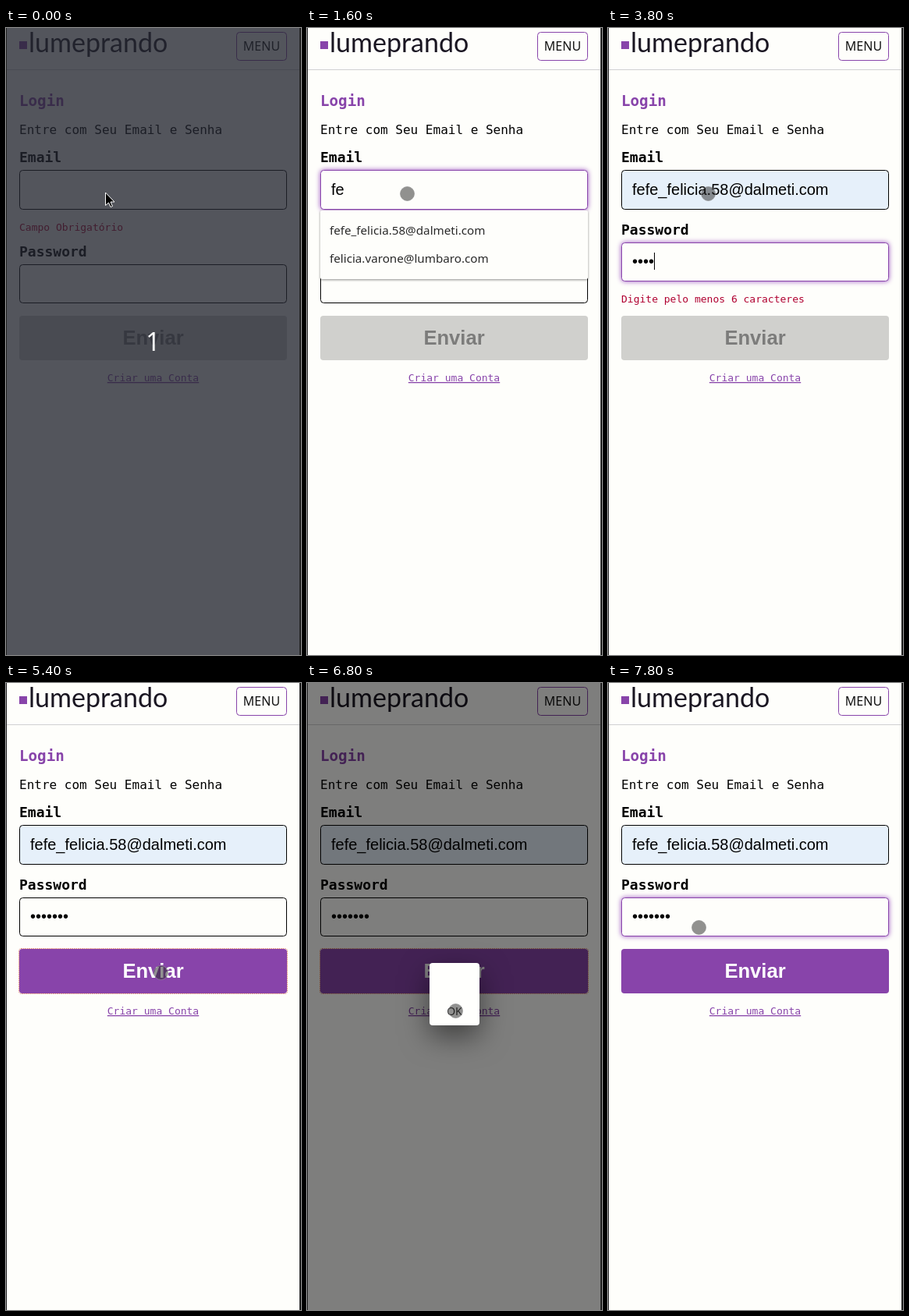
An HTML page for the animation above (8000 ms loop, 378 by 804 pixels).

```html
<!DOCTYPE html>
<html lang="pt">
<head>
<meta charset="utf-8">
<title>Login</title>
<style>
  html, body { margin: 0; width: 100%; height: 100%; overflow: hidden; background: #fefefb; }
  svg { display: block; }
  text { white-space: pre; }
  .mono { font-family: "DejaVu Sans Mono", monospace; }
  .sans { font-family: "Liberation Sans", Arial, sans-serif; }
  .ui { font-family: "Noto Sans", sans-serif; }
  .brand { font-family: Lato, sans-serif; }
  .bold { font-weight: bold; }
  .glow { filter: drop-shadow(0 0 3px #9a4fc0); }
  .menu { filter: drop-shadow(0 1px 1.5px rgba(0,0,0,.45)); }
  .dialog { filter: drop-shadow(0 14px 18px rgba(0,0,0,.5)); }
</style>
</head>
<body>
<svg id="stage" width="378" height="804" viewBox="0 0 378 804"></svg>
<script>
const LOOP = 8000, STEP = 200;
const PURPLE = '#8844aa', RED = '#b00030', PAPER = '#fefefb';
const EMAIL = 'fefe_felicia.58@dalmeti.com';
const OPTIONS = [EMAIL, 'felicia.varone@lumbaro.com', 'flavia.menura@lumbaro.com'];
const stage = document.getElementById('stage');

const clamp = v => Math.max(0, Math.min(1, v));
const ramp = (t, a, b) => clamp((t - a) / (b - a));
const ease = p => p * p * (3 - 2 * p);
const within = (t, a, b) => t >= a && t < b;

const text = (x, y, size, cls, fill, str, extra = '') =>
  `<text x="${x}" y="${y}" font-size="${size}" class="${cls}" fill="${fill}" ${extra}>${str}</text>`;
const rect = (x, y, w, h, fill, extra = '') =>
  `<rect x="${x}" y="${y}" width="${w}" height="${h}" fill="${fill}" ${extra}/>`;
const caret = (x, y) => rect(x, y, 1, 22, '#000');
const field = (y, h, focus, fill = PAPER) =>
  rect(17.5, y + .5, 342, h - 1, fill,
    `rx="4" stroke="${focus ? PURPLE : '#000'}" ${focus ? 'class="glow"' : ''}`);

function header() {
  return rect(1, 53, 375, 1, '#d0d0d2') +
    rect(17, 17, 10, 10, PURPLE) +
    text(29, 31, 34, 'brand', '#1a1622', 'lumeprando') +
    rect(295.5, 5.5, 64, 36, PAPER, `rx="4" stroke="${PURPLE}"`) +
    text(327.5, 29, 16, 'ui', '#111', 'MENU', 'text-anchor="middle"');
}

function form(t) {
  const emailError = t < 2200, passError = within(t, 3200, 4000), ready = t >= 4000;
  const typed = t < 1000 ? '' : t < 1200 ? 'f' : t < 2000 ? 'fe' : EMAIL;
  const dots = t < 3200 ? 0 : t < 4000 ? Math.floor((t - 3000) / STEP) : t < 4400 ? 6 : 7;
  const emailFocus = within(t, 400, 2200);
  const passFocus = within(t, 2200, 5400) || t >= 7600;
  const passCaret = within(t, 2200, 2600) || within(t, 3200, 5000) || within(t, 7600, 7800);
  const py = emailError ? 28 : 0;
  const by = emailError || passError ? 28 : 0;

  let s = text(17, 100, 19.2, 'mono bold', PURPLE, 'Login') +
    text(17, 136, 16, 'mono', '#000', 'Entre com Seu Email e Senha') +
    text(17, 172, 18, 'mono bold', '#000', 'Email') +
    field(182, 51, emailFocus, t >= 2000 ? '#e6f0fa' : PAPER) +
    text(31, 214, 20, 'sans', '#000', typed);
  if (within(t, 400, 1600)) s += caret([31, 37, 47][typed.length], 196);
  if (emailError) s += text(17, 260, 13, 'mono', RED, 'Campo Obrigatório');

  s += text(17, 265 + py, 18, 'mono bold', '#000', 'Password') +
    field(275 + py, 50, passFocus) +
    text(31, 306, 20, 'sans', '#000', '•'.repeat(dots));
  if (passCaret) s += caret(31 + dots * 7, 288);
  if (passError) s += text(17, 352, 13, 'mono', RED, 'Digite pelo menos 6 caracteres');

  s += rect(17, 341 + by, 343, 57, ready ? PURPLE : '#d0d0cd', 'rx="4"');
  if (within(t, 5400, 7600))
    s += rect(16.5, 340.5, 344, 58, 'none', 'rx="3" stroke="#e58a72" stroke-dasharray="1.5 1"');
  return s +
    text(188.5, 378 + by, 25.6, 'sans bold', ready ? '#fff' : '#7c7c7b', 'Enviar', 'text-anchor="middle"') +
    text(188.5, 425 + by, 13, 'mono', PURPLE, 'Criar uma Conta', 'text-anchor="middle" text-decoration="underline"');
}

function suggestions(t) {
  if (!within(t, 1000, 2400)) return '';
  const list = OPTIONS.slice(0, t < 1200 ? 3 : 2);
  const leaving = t >= 2200;
  const pose = leaving
    ? 'opacity=".45" transform="translate(188.5 278) scale(.977) translate(-188.5 -278)"' : '';
  return `<g ${pose}>` +
    rect(17, 234, 343, 16 + 36 * list.length, PAPER, 'rx="2" class="menu"') +
    (t >= 2000 ? rect(17, 242, 343, 36, '#c4c4c4') : '') +
    list.map((o, i) => text(29, 265 + 36 * i, 15.2, 'ui', '#2a2a2a', o)).join('') + '</g>';
}

function dialog(t) {
  const a = ramp(t, 5600, 6000) * (1 - ramp(t, 6800, 7200));
  if (!a) return '';
  return rect(1, 0, 375, 804, '#000', `opacity="${a / 2}"`) +
    `<g opacity="${a}">` + rect(157, 359, 64, 80, '#fffffd', 'rx="4" class="dialog"') +
    text(189, 426, 14, 'ui', '#222', 'OK', 'text-anchor="middle"') + '</g>';
}

function countdown(t) {
  const a = 1 - ramp(t, 0, 400);
  return a ? `<g opacity="${a}">` + rect(1, 0, 375, 804, 'rgba(35,38,48,.78)') +
    text(188.5, 414, 32, 'ui', '#fff', '1', 'text-anchor="middle"') + '</g>' : '';
}

function pointer(t) {
  if (t < 400)
    return '<path d="M127.500 211v16.500l4-3.500 2.500 5.500 2.500-1-2.500-5.500h5z" fill="#000" stroke="#fff"/>';
  const moves = [[4200, 5200, 70, 159], [5600, 6800, -8, 49], [6800, 7600, -74, -107]];
  let x = 128, y = 212;
  for (const [a, b, dx, dy] of moves) {
    const p = ease(ramp(t, a, b));
    x += dx * p;
    y += dy * p;
  }
  return `<circle cx="${x + .5}" cy="${y + .5}" r="9" fill="rgba(35,35,35,.5)" stroke="rgba(140,140,140,.7)"/>`;
}

function draw(t) {
  stage.innerHTML = rect(0, 0, 378, 804, PAPER) + header() + form(t) + suggestions(t) +
    dialog(t) + countdown(t) + pointer(t) +
    rect(0, 0, 1, 804, '#222') + rect(376, 0, 2, 804, '#222');
}

// The screen refreshes five times a second.
let last = -1;
function tick() {
  const t = Math.floor(performance.now() % LOOP / STEP) * STEP;
  if (t !== last) draw(last = t);
  requestAnimationFrame(tick);
}
tick();
</script>
</body>
</html>
```
